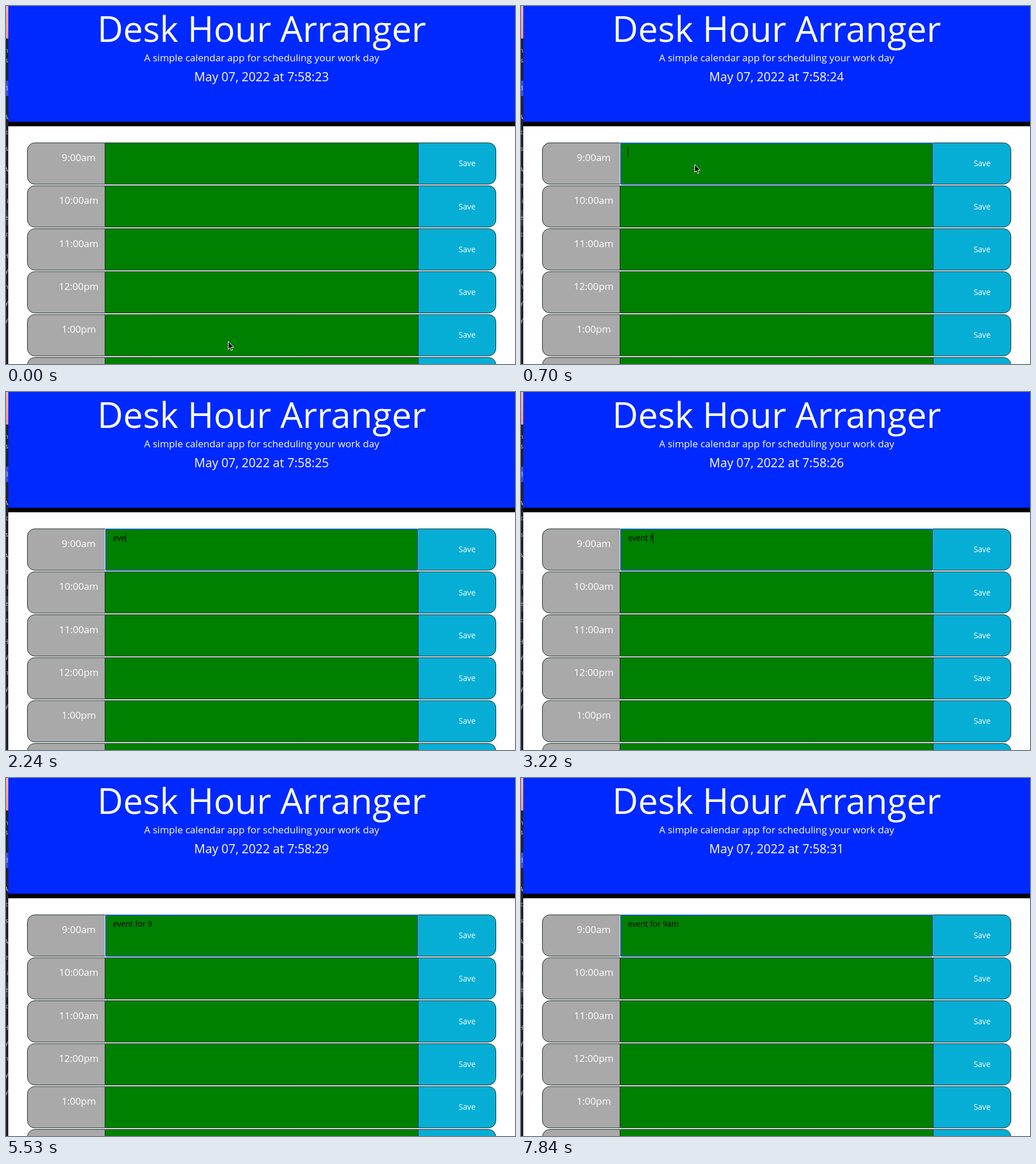
Animation of 892 by 628 pixels, one loop 8000 ms. Source, as an HTML page:

```html
<!DOCTYPE html>
<html lang="en">
<head>
<meta charset="utf-8">
<title>Day planner</title>
<style>
  html, body { margin: 0; width: 100%; height: 100%; overflow: hidden; background: #fff; }
  svg { display: block; width: 892px; height: 628px; font-family: "Open Sans", "Noto Sans", sans-serif; }
  .head { fill: #fff; text-anchor: middle; }
  .hour { fill: #fff; font-size: 17.1px; text-anchor: middle; }
  .save { fill: #fff; font-size: 13.7px; text-anchor: middle; }
  .cell { stroke: #1c2a2c; stroke-width: 1; }
  .scrap { fill: #c9c9d2; font-size: 11px; text-anchor: end; }
</style>
</head>
<body>
<svg viewBox="0 0 892 628">
  <defs>
    <linearGradient id="glow" x2="0" y2="1">
      <stop offset="0" stop-color="#f3b3ae"/>
      <stop offset="1" stop-color="#f59a92"/>
    </linearGradient>
    <clipPath id="edge"><rect width="4" height="628"/></clipPath>
  </defs>

  <g id="strip" clip-path="url(#edge)">
    <rect width="4" height="628" fill="#22212c"/>
    <rect width="4" height="57" fill="url(#glow)"/>
    <rect y="131" width="4" height="27" fill="#3d50c4"/>
    <rect y="358" width="4" height="27" fill="#393944"/>
  </g>

  <rect x="4" width="888" height="203" fill="#0029ff"/>
  <rect x="4" y="203" width="888" height="8"/>
  <g class="head">
    <text x="448" y="63" font-size="62">Desk Hour Arranger</text>
    <text x="448" y="96.5" font-size="17.1">A simple calendar app for scheduling your work day</text>
    <text id="clock" x="447.8" y="132" font-size="21.5"></text>
  </g>

  <g id="rows"></g>

  <g id="focus" fill="none">
    <rect x="173.5" y="239.5" width="548.5" height="74" rx="2" stroke="#e4ebf2"/>
    <rect x="174.8" y="240.6" width="546.4" height="72" rx="1.5" stroke="#0a5bc4" stroke-width="1.6"/>
  </g>
  <text id="note" x="187.5" y="261" font-size="13.7" xml:space="preserve"></text>
  <rect id="caret" y="246" width="1" height="19"/>
  <path id="mouse" d="M0 0V13.6L3.1 10.8 5.2 15.8 7.4 14.9 5.3 10H9.6Z" stroke="#fff" stroke-width="1" stroke-linejoin="round"/>
</svg>

<script>
const NS = "http://www.w3.org/2000/svg";
const LOOP = 8000, STEP = 70, BLINK = 490;
const $ = id => document.getElementById(id);

function add(parent, tag, attrs, text) {
  const el = document.createElementNS(NS, tag);
  for (const key in attrs) el.setAttribute(key, attrs[key]);
  if (text) el.textContent = text;
  parent.append(el);
}

const scraps = [["n", 82], ["us", 99], ["B", 148], ["A", 199], ["c", 225], ["s", 254], ["A", 291], ["e", 318],
  ["i", 346], ["e", 375], ["c", 404], ["H", 442], ["y", 468], ["n", 496], ["ly", 524], ["ly", 554]];
for (const [text, y] of scraps) add($("strip"), "text", { class: "scrap", x: 4, y }, text);

["9:00am", "10:00am", "11:00am", "12:00pm", "1:00pm", "2:00pm"].forEach((hour, i) => {
  const y = 240 + 75.3 * i, h = 72.6, r = 13;
  const rows = $("rows");
  add(rows, "path", { class: "cell", fill: "#a9a9a9",
    d: `M173.5 ${y}H${37.5 + r}a${r} ${r} 0 0 0 ${-r} ${r}v${h - 2 * r}a${r} ${r} 0 0 0 ${r} ${r}H173.5Z` });
  add(rows, "path", { class: "cell", fill: "#06aed5",
    d: `M722 ${y}H${858.5 - r}a${r} ${r} 0 0 1 ${r} ${r}v${h - 2 * r}a${r} ${r} 0 0 1 ${-r} ${r}H722Z` });
  add(rows, "rect", { class: "cell", fill: "#008000", x: 173.5, y, width: 548.5, height: h, rx: 1 });
  add(rows, "text", { class: "hour", x: 127.5, y: y + 32 }, hour);
  add(rows, "text", { class: "save", x: 808, y: y + 41.2 }, "Save");
});

const message = "event for 9am";
const keys = [1820, 1960, 2240, 2380, 2520, 2660, 3150, 3360, 3500, 3640, 4830, 6090, 6300];
const ticks = [560, 1540, 2520, 3500, 4480, 5530, 6580, 7630];
const focusAt = 630;
const passed = (times, t) => times.filter(x => x <= t).length;

function draw(time) {
  const t = Math.floor(time / STEP) * STEP;
  $("clock").textContent = "May 07, 2022 at 7:58:" + (23 + passed(ticks, t));

  const typed = passed(keys, t);
  const note = $("note");
  note.textContent = message.slice(0, typed);

  const focused = t >= focusAt;
  $("focus").setAttribute("visibility", focused ? "visible" : "hidden");
  const since = t - (typed ? keys[typed - 1] : focusAt);
  const lit = focused && Math.floor(since / BLINK) % 2 === 0;
  $("caret").setAttribute("visibility", lit ? "visible" : "hidden");
  $("caret").setAttribute("x", 187.3 + (typed ? note.getComputedTextLength() : 0));

  // The pointer glides to the first row and hides once typing begins.
  const p = Math.min(t / 560, 1), ease = p * p * (3 - 2 * p);
  $("mouse").setAttribute("transform", `translate(${389.5 - 85 * ease} ${588.5 - 310.5 * ease})`);
  $("mouse").setAttribute("visibility", typed ? "hidden" : "visible");
}

function frame() {
  draw(performance.now() % LOOP);
  requestAnimationFrame(frame);
}
frame();
</script>
</body>
</html>
```
